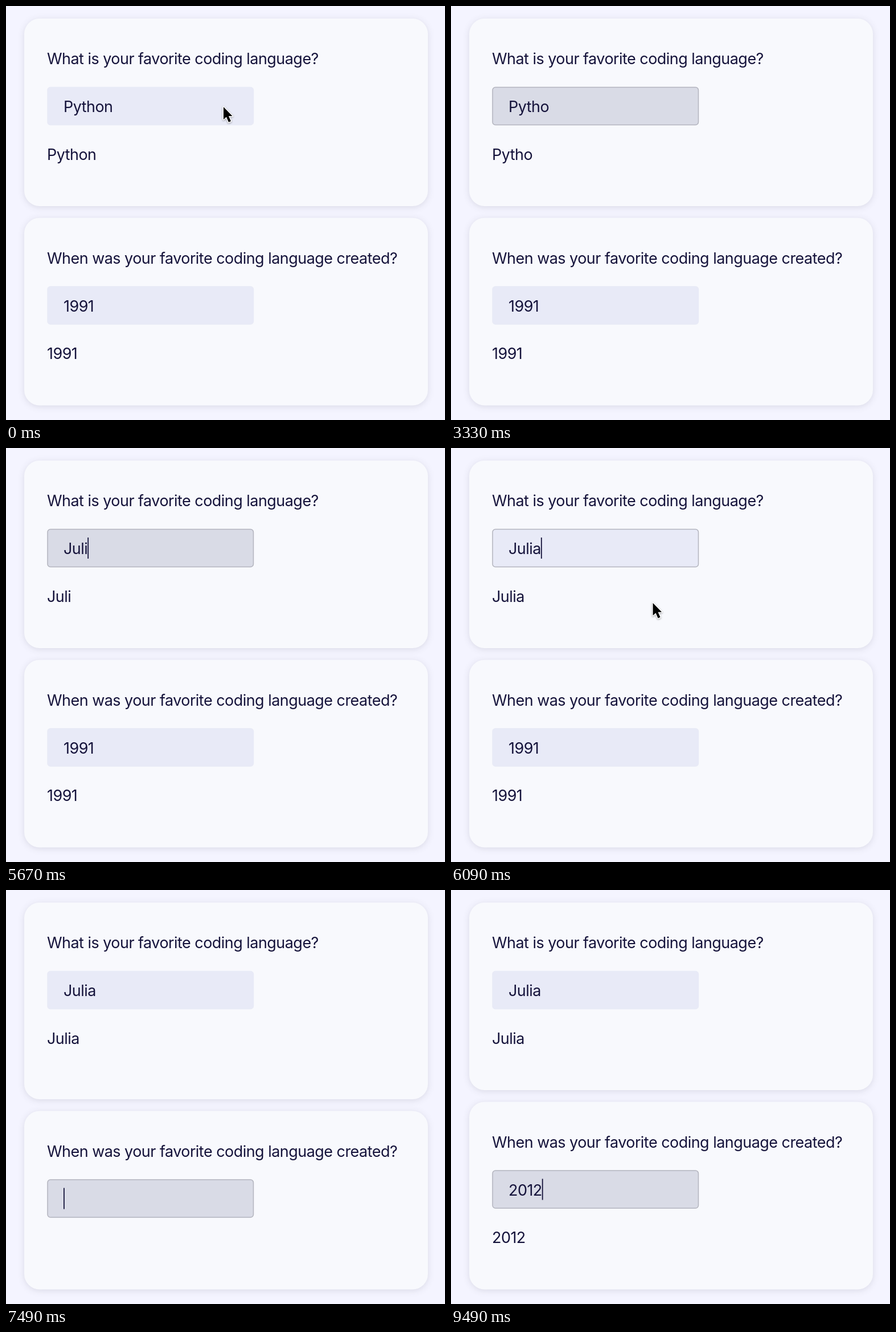
Recreate the animation shown at these times as an HTML page. Size 771 by 726 pixels, loop 9.67 s.

```html
<!DOCTYPE html>
<html lang="en">
<head>
<meta charset="utf-8">
<title>Reactive inputs</title>
<style>
  html, body { margin: 0; width: 100%; height: 100%; overflow: hidden; background: #f4f4ff; }
  svg { display: block; }
  text {
    font: 400 27px Inter, "Open Sans", sans-serif;
    font-optical-sizing: none;
    letter-spacing: -0.02em;
    fill: #15133b;
    white-space: pre;
  }
  .card { fill: #f8f9fd; filter: drop-shadow(0 2px 6px rgba(30, 30, 50, .12)); }
  .caret { fill: #15133b; }
  .halo { fill: #fff; stroke: #fff; stroke-width: 3; stroke-linejoin: round; }
  #arrow { filter: drop-shadow(0 1px 1.5px rgba(0, 0, 0, .35)); }
  #beam path { fill: none; stroke: #111; stroke-width: 1.8; }
  #beam .halo { stroke: #fff; stroke-width: 4; }
</style>
</head>
<body>
<svg id="stage" width="771" height="726" viewBox="0 0 771 726">
  <g id="cards"></g>
  <g id="arrow">
    <path class="halo" d="M0 0v22l5-4.5 4 9.3 4-1.7-4-9.1h6.6z"/>
    <path d="M0 0v22l5-4.5 4 9.3 4-1.7-4-9.1h6.6z"/>
  </g>
  <g id="beam">
    <path class="halo" d="M-5.5-13q5 0 5.5 4q.5-4 5.5-4M0-9V9M-5.5 13q5 0 5.5-4q.5 4 5.5 4M-3 2h6"/>
    <path d="M-5.5-13q5 0 5.5 4q.5-4 5.5-4M0-9V9M-5.5 13q5 0 5.5-4q.5 4 5.5 4M-3 2h6"/>
  </g>
</svg>
<script>
const LOOP = 9670, BLINK = 500, ROW = 349.5, SHIFT = 16;
const FOCUS = [2830, 6490];

// Field contents as [time, value]; each value holds until the next.
const languages = [
  [0, "Python"], [3150, "Pytho"], [3420, "Pyth"], [3670, "Pyt"], [3910, "Py"], [4090, "P"], [4360, ""],
  [5090, "J"], [5300, "Ju"], [5450, "Jul"], [5640, "Juli"], [5790, "Julia"]
];
const years = [
  [0, "1991"], [6730, "199"], [6910, "19"], [7060, "1"], [7210, ""],
  [7700, "2"], [7880, "20"], [8090, "201"], [8450, "2012"]
];
// Pointer path as [time, x, y].
const pointer = [[0, 382, 177], [2670, 382, 177], [2830, 372, 181], [5940, 372, 181], [6390, 305.5, 527]];
// The pointer hides while typing.
const hidden = [[3150, 5940], [6730, LOOP]];

// Blinking restarts on focus and on every inserted character, not on deletion.
const restarts = [...FOCUS, ...[languages, years].flatMap(steps =>
  steps.filter(([, value], i) => i && value.length > steps[i - 1][1].length).map(([time]) => time))]
  .sort((a, b) => a - b);

const make = (parent, tag, attrs, content = "") => {
  const node = document.createElementNS("http://www.w3.org/2000/svg", tag);
  set(node, attrs);
  node.textContent = content;
  return parent.appendChild(node);
};
const set = (node, attrs) => {
  for (const name in attrs) node.setAttribute(name, attrs[name]);
};
const show = (node, visible) => set(node, { visibility: visible ? "visible" : "hidden" });
const valueAt = (steps, t) => steps.findLast(([time]) => time <= t)[1];

function makeCard(question, steps) {
  const root = make(cards, "g", {});
  return {
    root, steps,
    panel: make(root, "rect", { class: "card", x: 32, y: 22, width: 709, rx: 27 }),
    label: make(root, "text", { x: 72, y: 102 }, question),
    field: make(root, "rect", { x: 73, y: 142.5, width: 361.5, height: 66, rx: 5, "stroke-width": 1.5 }),
    input: make(root, "text", { x: 101, y: 186 }),
    caret: make(root, "rect", { class: "caret", y: 157, width: 1.8, height: 37 }),
    answer: make(root, "text", { x: 72, y: 269.5 })
  };
}

const cards = document.getElementById("cards");
const arrow = document.getElementById("arrow");
const beam = document.getElementById("beam");
const forms = [
  makeCard("What is your favorite coding language?", languages),
  makeCard("When was your favorite coding language created?", years)
];

function pointerAt(t) {
  const next = pointer.findIndex(([time]) => time > t);
  if (next < 0) return pointer.at(-1).slice(1);
  const [t0, x0, y0] = pointer[next - 1], [t1, x1, y1] = pointer[next];
  const p = (t - t0) / (t1 - t0), ease = p * p * (3 - 2 * p);
  return [x0 + (x1 - x0) * ease, y0 + (y1 - y0) * ease];
}

function draw(t) {
  const values = forms.map(form => valueAt(form.steps, t));
  // An empty answer shrinks its card; both cards share the freed height.
  const shift = SHIFT * ((values[1] === "") - (values[0] === ""));
  const [px, py] = pointerAt(t);
  const focused = t >= FOCUS[1] ? 1 : t >= FOCUS[0] ? 0 : -1;
  const epoch = restarts.findLast(time => time <= t);
  const caretOn = Math.floor((t - epoch) / BLINK) % 2 === 0;
  let overField = false;

  forms.forEach((form, i) => {
    const top = i * (ROW + shift);
    const hovered = t >= 2700 && px > 72 && px < 435 && py > top + 142 && py < top + 209;
    overField ||= hovered;
    set(form.root, { transform: `translate(0 ${top})` });
    set(form.panel, { height: 329 + (i ? -shift : shift) });
    set(form.field, {
      fill: hovered ? "#d9dbe6" : "#e8eaf7",
      stroke: focused === i ? "#b3b4be" : "#e8eaf6"
    });
    form.input.textContent = form.answer.textContent = values[i];
    const width = values[i] ? form.input.getComputedTextLength() : 0;
    set(form.caret, { x: 101 + width });
    show(form.caret, focused === i && caretOn);
  });

  const visible = !hidden.some(([from, to]) => t >= from && t < to);
  show(arrow, visible && !overField);
  show(beam, visible && overField);
  for (const node of [arrow, beam]) set(node, { transform: `translate(${px} ${py})` });
}

const start = performance.now();
function tick() {
  draw((performance.now() - start) % LOOP);
  requestAnimationFrame(tick);
}
tick();
</script>
</body>
</html>
```
